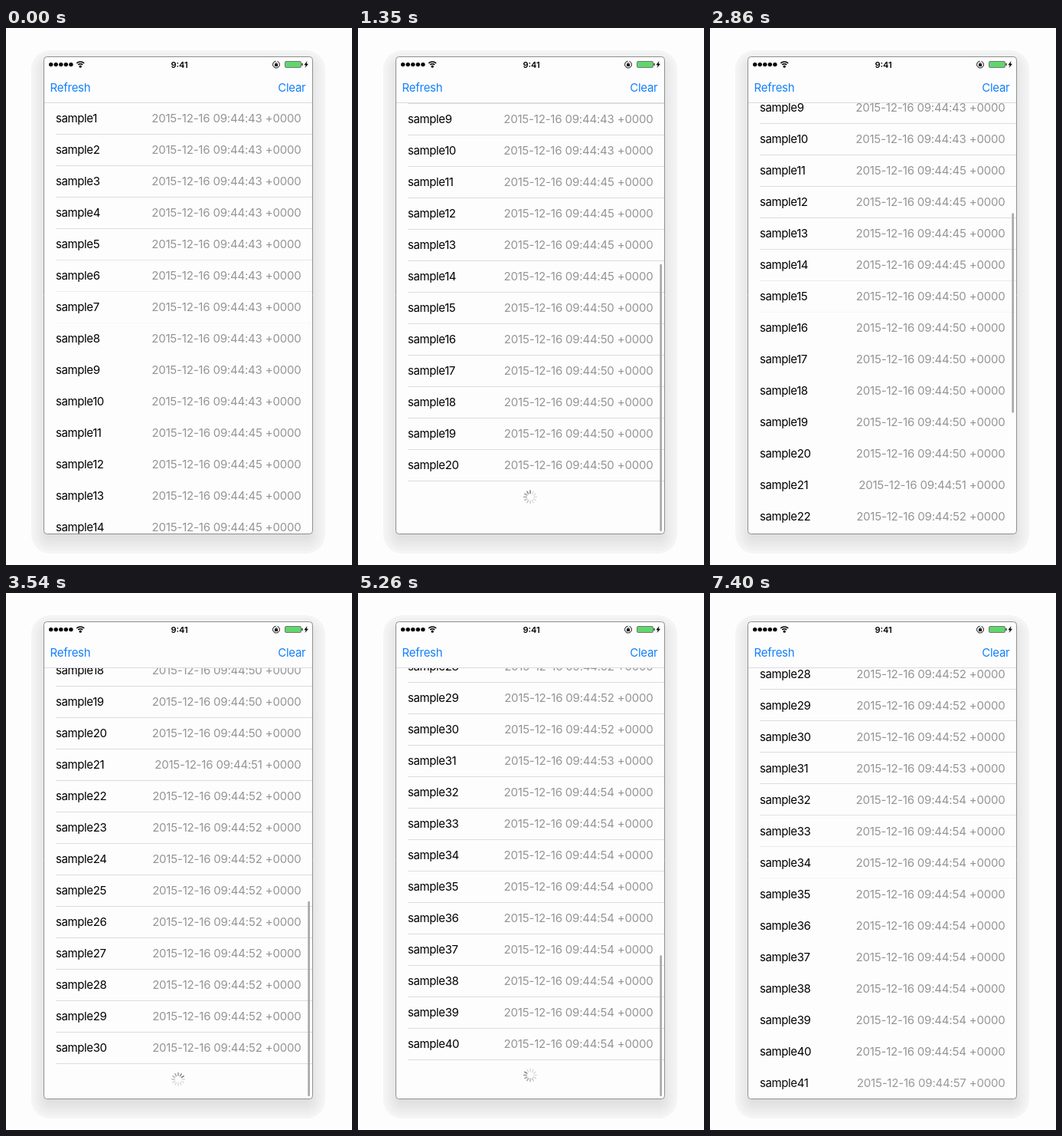
Recreate the animation shown at these times as an HTML page with a canvas. Size 452 by 700 pixels, loop 8.08 s.

```html
<!DOCTYPE html>
<html lang="en">
<head>
<meta charset="utf-8">
<title>Paginated list</title>
<style>
  html, body { margin: 0; width: 100%; height: 100%; overflow: hidden; background: #fdfdfd; }
  canvas { display: block; }
</style>
</head>
<body>
<canvas id="stage" width="452" height="700"></canvas>
<script>
const ctx = document.getElementById('stage').getContext('2d');
const LOOP = 8080, ROW = 41, LIST_TOP = 97.5, BOTTOM = 659, FIRST_PAGE = 20, PAGE = 10;
const BLUE = '#1480fa', PAPER = '#fdfdfd';

// Each flick runs past the end of the list at its peak, bounces back and waits for an answer.
const FLICKS = [
  { start: 885, peak: 1348, answer: 1930 },
  { start: 2655, peak: 3369, answer: 3940 },
  { start: 4718, peak: 5163, answer: 5850 }
];
const OVERSHOOT = 28, BOUNCE_DECAY = 95, SETTLE = 400, FADE = 250;
const RETRY_TAP = 6310, RETRY_ANSWER = 7160;

const clamp01 = v => Math.max(0, Math.min(1, v));
const easeInOut = u => u < 0.5 ? 4 * u ** 3 : 1 - 4 * (1 - u) ** 3;
const endOfList = count => LIST_TOP + ROW * (count + 1) - BOTTOM;

function scrollAt(t) {
  const page = FLICKS.findLastIndex(f => t >= f.start);
  if (page < 0) return 0;
  const { start, peak } = FLICKS[page];
  const rest = endOfList(FIRST_PAGE + PAGE * page);
  if (t >= peak) return rest + OVERSHOOT * Math.exp((peak - t) / BOUNCE_DECAY);
  const from = page ? rest - ROW * PAGE : 0;
  return from + (rest + OVERSHOOT - from) * easeInOut((t - start) / (peak - start));
}

// Row count before and after the latest load, and how far the new rows have faded in.
function rowsAt(t) {
  const [first, second] = FLICKS;
  const full = FIRST_PAGE + 2 * PAGE;
  const [time, before, after] =
    t >= RETRY_ANSWER ? [RETRY_ANSWER, full, full + 1] :
    t >= second.answer ? [second.answer, full - PAGE, full] :
    t >= first.answer ? [first.answer, FIRST_PAGE, full - PAGE] :
    [0, FIRST_PAGE, FIRST_PAGE];
  return { before, after, inserted: clamp01((t - time) / FADE) };
}

function stampOf(n) {
  const [, seconds] = [[10, 43], [14, 45], [20, 50], [21, 51], [30, 52], [31, 53], [40, 54], [41, 57]]
    .find(([last]) => n <= last);
  return `2015-12-16 09:44:${seconds} +0000`;
}

function text(str, x, y, color, align = 'left', spacing = -0.25, font = '15px') {
  ctx.font = `${font} Inter, "Open Sans", sans-serif`;
  ctx.letterSpacing = spacing + 'px';
  ctx.textAlign = align;
  ctx.fillStyle = color;
  ctx.fillText(str, x, y);
}

function roundRect(x, y, w, h, r) {
  ctx.beginPath();
  ctx.roundRect(x, y, w, h, r);
}

function disc(x, y, r) {
  ctx.beginPath();
  ctx.arc(x, y, r, 0, 7);
  ctx.fill();
}

function arc(x, y, r, from, to) {
  ctx.beginPath();
  ctx.arc(x, y, r, from, to);
  ctx.stroke();
}

function line(x0, y0, x1, y1, color, width = 1) {
  ctx.strokeStyle = color;
  ctx.lineWidth = width;
  ctx.beginPath();
  ctx.moveTo(x0, y0);
  ctx.lineTo(x1, y1);
  ctx.stroke();
}

const gray = v => `rgb(${v},${v},${v})`;

function drawBackdrop() {
  ctx.fillStyle = PAPER;
  ctx.fillRect(0, 0, 452, 700);
  for (let i = 0; i < 6; i++) {
    const spread = 17 - 4 * i;
    ctx.fillStyle = gray(244 - 4 * i);
    roundRect(50 - spread, 46 - spread, 350 + 2 * spread, 622 + 2 * spread, 8 + spread);
    ctx.fill();
  }
  ctx.fillStyle = PAPER;
  roundRect(49.5, 37.5, 351, 622, 4);
  ctx.fill();
}

function drawStatusBar() {
  ctx.fillStyle = ctx.strokeStyle = '#000';
  for (let i = 0; i < 5; i++) disc(58.7 + 6.55 * i, 47.6, 2.7);

  ctx.lineWidth = 1.6;
  for (const r of [4.2, 7]) arc(97.2, 51, r, -Math.PI * 0.75, -Math.PI * 0.25);
  disc(97.2, 50.2, 1.6);

  text('9:41', 226.5, 51.6, '#000', 'center', 0, '600 11px');

  ctx.lineWidth = 1;
  arc(353, 47.6, 4.4, -1.2, 4.6);
  ctx.fillRect(351, 47, 4, 3);
  arc(353, 47, 1.3, Math.PI, 0);

  roundRect(364.5, 43.5, 21, 8, 1.5);
  ctx.fillStyle = '#5fd76c';
  ctx.fill();
  ctx.strokeStyle = '#777';
  ctx.stroke();
  ctx.fillStyle = '#333';
  ctx.fillRect(386.3, 46, 1.4, 3);
  ctx.fillStyle = '#000';
  ctx.fill(new Path2D('M393.5 43 L389.4 48.3 H391.7 L390.6 52 L395 46.8 H392.6 Z'));
}

function drawSpinner(x, y, t) {
  const lead = Math.floor((t - 1350) * 12 / 1000) + 24;
  ctx.lineCap = 'round';
  for (let i = 0; i < 12; i++) {
    const age = (lead - i + 12) % 12;
    const angle = i * Math.PI / 6 - Math.PI / 2, c = Math.cos(angle), s = Math.sin(angle);
    line(x + 4.9 * c, y + 4.9 * s, x + 8.3 * c, y + 8.3 * s, gray(Math.min(222, 130 + age * 14)), 1.6);
  }
  ctx.lineCap = 'butt';
}

function drawIndicator(t, scroll, count) {
  const flick = FLICKS.find(f => t > f.start + 50 && t < f.peak + SETTLE + FADE);
  if (!flick) return;
  const limit = endOfList(count);
  const length = 331000 / (ROW * (count + 1)) - 1.33 * Math.max(0, scroll - limit);
  const top = 98 + (558 - length) * Math.min(1, scroll / limit);
  ctx.globalAlpha = 1 - clamp01((t - flick.peak - SETTLE) / FADE);
  ctx.fillStyle = '#a9a9ab';
  roundRect(394.3, top, 2.7, length, 1.35);
  ctx.fill();
  ctx.globalAlpha = 1;
}

function drawList(t) {
  const scroll = scrollAt(t);
  const { before, after, inserted } = rowsAt(t);
  const waiting = FLICKS.some(f => t >= f.start + 200 && t >= f.peak - 100 && t < f.answer);

  ctx.save();
  roundRect(50, 98, 350, 561, [0, 0, 4, 4]);
  ctx.clip();
  for (let n = 1; n <= after; n++) {
    const top = LIST_TOP + ROW * (n - 1) - scroll;
    if (top < 40 || top > BOTTOM) continue;
    const shown = n > before ? inserted : 1;
    ctx.globalAlpha = shown;
    text('sample' + n, 65, top + 25.5, '#000', 'left', -0.4);
    text(stampOf(n), 385.5, top + 25.5, '#959598', 'right', -0.19);

    // Hairlines lose contrast down the screen except while more rows are awaited.
    const y = Math.round(top + ROW - 0.5) + 0.5;
    ctx.globalAlpha = shown * (waiting ? 1 : clamp01((410 - y) / 150));
    line(65, y, 400, y, '#dcdcde');
  }
  ctx.globalAlpha = 1;

  const pushed = ROW * (after - before) * (1 - (1 - inserted) ** 2);
  const footer = LIST_TOP + ROW * (before + 0.5) + pushed - scroll;
  if (footer < BOTTOM + 20) {
    const failed = t >= FLICKS[2].answer && t < RETRY_TAP;
    if (failed) text('Retry', 225.5, footer + 5.5, BLUE, 'center');
    else drawSpinner(225, footer, t);
  }
  drawIndicator(t, scroll, after);
  ctx.restore();
}

function draw(t) {
  drawBackdrop();
  drawList(t);
  drawStatusBar();
  text('Refresh', 57.5, 83, BLUE);
  text('Clear', 391.5, 83, BLUE, 'right');
  line(50, 97.5, 400, 97.5, '#dcdcde');
  ctx.strokeStyle = '#8e8e8e';
  roundRect(49.5, 37.5, 351, 622, 4);
  ctx.stroke();
}

const start = performance.now();
function tick() {
  draw((performance.now() - start) % LOOP);
  requestAnimationFrame(tick);
}
tick();
</script>
</body>
</html>
```
